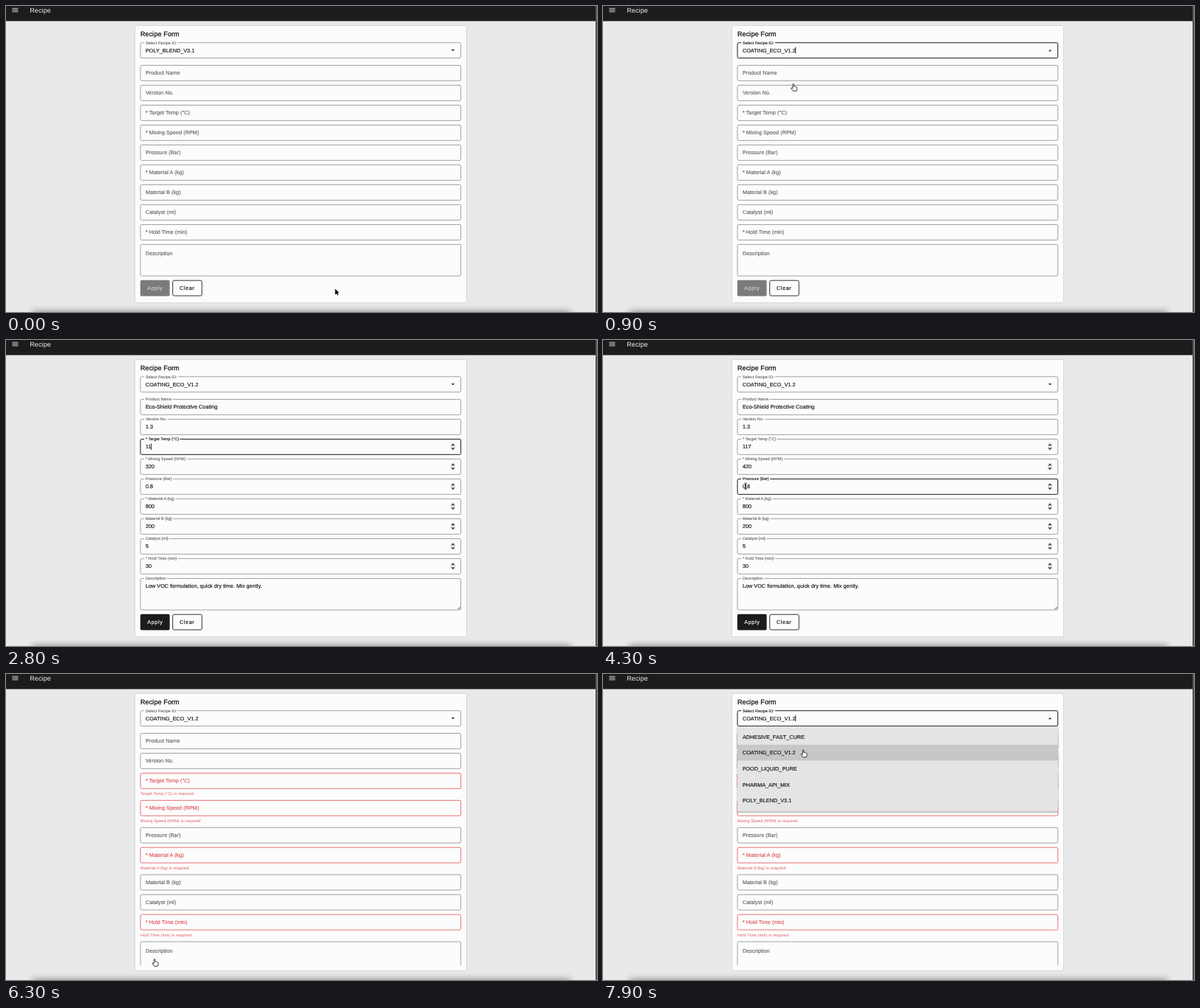
Write an HTML page that moves like this. It is 800 px wide and 415 px high and loops after 8 s.

```html
<!DOCTYPE html>
<html lang="en">
<head>
<meta charset="utf-8">
<title>Recipe form</title>
<style>
  html, body { margin: 0; width: 100%; height: 100%; overflow: hidden; background: #e9e9e9; }
  svg { display: block; width: 800px; height: 415px; }
  text {
    font: 7.2px "Liberation Sans", Arial, Helvetica, sans-serif;
    letter-spacing: .0675px; fill: #111; stroke: #111; stroke-width: .16px;
    text-rendering: geometricPrecision; white-space: pre;
  }
  .title { font-size: 9px; letter-spacing: .11px; stroke-width: .25px; }
  .head { fill: #f2f2f2; stroke: none; }
  .help { font-size: 5.4px; letter-spacing: .17px; fill: #e0555a; stroke: none; }
  .btn { letter-spacing: .64px; }
  .menu { filter: drop-shadow(0 1px 1.2px rgba(0, 0, 0, .4)); }
  .glow { filter: blur(5px); }
</style>
</head>
<body>
<svg id="stage" viewBox="0 0 800 415" xmlns="http://www.w3.org/2000/svg">
  <defs>
    <clipPath id="view"><rect x="175" y="26" width="448" height="369"/></clipPath>
  </defs>
  <rect width="800" height="415" fill="#e9e9e9"/>
  <rect width="800" height="20.5" fill="#1c1c1c"/>
  <path d="M8.4 3.3h8.1M8.4 5.55h8.1M8.4 7.8h8.1" stroke="#eee" stroke-width=".9"/>
  <text class="title head" x="32.2" y="8.9">Recipe</text>
  <rect x="174.5" y="26.5" width="449" height="376" rx="1" fill="#fcfcfc" stroke="#d6d6d6"/>
  <rect class="glow" x="36" y="414" width="728" height="20" fill="#000" opacity=".4"/>
  <rect x="798" width="2" height="415" fill="#555"/>
  <text class="title" x="182" y="41">Recipe Form</text>
  <g id="form" clip-path="url(#view)"></g>
  <g id="menu" class="menu"></g>
  <g id="mouse"></g>
</svg>
<script>
const LOOP = 8000, STEP = 100;
const FILL = 1050, RESET = 6080;
const LEFT = 182, WIDTH = 433.7, TEXT_X = 188.9;
const $ = id => document.getElementById(id);
const form = $('form'), menu = $('menu'), mouse = $('mouse');

function set(el, attrs) {
  for (const k in attrs) el.setAttribute(k, attrs[k]);
  return el;
}
function add(parent, tag, attrs, text) {
  const el = set(document.createElementNS('http://www.w3.org/2000/svg', tag), attrs);
  if (text) el.textContent = text;
  return parent.appendChild(el);
}
const ink = (el, color) => set(el, { style: `fill:${color};stroke:${color}` });
const clamp = v => Math.max(0, Math.min(1, v));
const ease = v => { v = clamp(v); return v * v * (3 - 2 * v); };
const ramp = (t, start, len = 100) => ease((t - start) / len);
const within = (t, spans) => spans.some(([a, b]) => t >= a && t < b);
const grey = (a, b, p) => { const v = Math.round(a + (b - a) * p); return `rgb(${v},${v},${v})`; };

// label, loaded value, focus spans
const specs = [
  ['Select Recipe ID:', '', [[450, 1850], [7600, LOOP + 200]]],
  ['Product Name', 'Eco-Shield Protective Coating'],
  ['Version No.', '1.3'],
  ['* Target Temp (°C)', '110', [[1850, 3500]]],
  ['* Mixing Speed (RPM)', '320', [[3500, 4150]]],
  ['Pressure (Bar)', '0.8', [[4150, 4950]]],
  ['* Material A (kg)', '800'],
  ['Material B (kg)', '200', [[4950, RESET]]],
  ['Catalyst (ml)', '5'],
  ['* Hold Time (min)', '30'],
  ['Description', 'Low VOC formulation, quick dry time. Mix gently.']
];
// time, field, value, caret position
const edits = [
  [1850, 3, '110', 3], [2300, 3, '11', 2], [2950, 3, '117', 3],
  [3500, 4, '320', 1], [3600, 4, '20', 0], [3750, 4, '420', 1],
  [4150, 5, '0.8', 1], [4400, 5, '.8', 0], [4550, 5, '1.8', 1],
  [4950, 7, '200', 1], [5300, 7, '00', 0], [5500, 7, '300', 1]
];
// time, x, y, pointer held until the next stop
const path = [
  [0, 445.5, 383.5, 'arrow'], [100, 445.5, 383.5], [400, 300, 60], [500, 300, 60],
  [750, 257.5, 105.5, 'hand'], [1100, 257.5, 105.5], [1700, 200, 145],
  [3200, 200, 145], [3450, 192.5, 171], [3850, 192.5, 171], [4050, 193, 198],
  [4700, 193, 198], [4900, 193, 252], [5700, 193, 252],
  [6050, 201, 386.5, 'hand'], [6350, 201, 386.5], [6500, 205, 349],
  [7400, 245, 147], [7530, 285, 62], [7620, 285, 62], [7820, 271, 103, 'hand'], [LOOP, 271, 103]
];
const hidden = [[2300, 3150], [3600, 3850], [4400, 4700], [5300, 5700]];
const options = ['ADHESIVE_FAST_CURE', 'COATING_ECO_V1.2', 'FOOD_LIQUID_PURE', 'PHARMA_API_MIX', 'POLY_BLEND_V3.1'];
const ROW = 21.6, MENU_TOP = 74.4;

const fields = specs.map(([label, value, focus = []], i) => {
  const g = add(form, 'g', {});
  const tall = i === 10;
  const f = {
    g, label, value, focus, tall,
    required: label[0] === '*',
    number: i > 2 && i < 10,
    base: i ? 53 + 27 * i : 49.3,
    height: tall ? 42.6 : 20.9
  };
  f.box = add(g, 'rect', { x: LEFT, y: .45, width: WIDTH, height: f.height, rx: 1.8, fill: 'none' });
  f.notch = add(g, 'rect', { x: 187, y: -.6, height: 2.4, fill: '#fcfcfc' });
  f.name = add(g, 'text', {}, label);
  f.text = add(g, 'text', { x: TEXT_X, y: 13.4 });
  if (f.number) {
    f.spin = add(g, 'g', {});
    add(f.spin, 'rect', { x: 601.6, y: 5.6, width: 6.8, height: 10.4, rx: 3, fill: '#e8e8e8' });
    add(f.spin, 'path', { d: 'M603.3 9.4l1.7-2 1.7 2M603.3 12.2l1.7 2 1.7-2', fill: 'none', stroke: '#222', 'stroke-width': 1.1 });
  }
  if (tall) f.spin = add(g, 'path', { d: 'M611.5 42l3.2-3.2M613.2 42l1.5-1.5', stroke: '#444', 'stroke-width': .8 });
  if (f.required) f.help = add(g, 'text', { class: 'help', x: 182, y: 30 }, label.slice(2) + ' is required');
  return f;
});
const chevron = add(fields[0].g, 'path', { d: 'M-2.2-1.1h4.4L0 1.1z', fill: '#222' });
const caret = add(form, 'rect', { width: .9, height: 8.6, fill: '#111' });

const buttons = add(form, 'g', {});
const apply = add(buttons, 'rect', { x: 181.8, y: 371.8, width: 39.8, height: 21.6, rx: 2 });
const applyText = add(buttons, 'text', { class: 'btn', x: 191.3, y: 385.1 }, 'Apply');
add(buttons, 'rect', { x: 225.7, y: 372.2, width: 39.5, height: 20.8, rx: 2, fill: '#fcfcfc', stroke: '#1c1c1c', 'stroke-width': .9 });
add(buttons, 'text', { class: 'btn', x: 235, y: 385.1 }, 'Clear');

add(menu, 'rect', { x: 182, y: 71.2, width: 433.6, height: 115.4, rx: 1, fill: '#e4e4e4' });
const rows = options.map((name, i) => {
  const y = MENU_TOP + ROW * i;
  const rect = add(menu, 'rect', { x: 182, y, width: 433.6, height: ROW });
  add(menu, 'text', { x: TEXT_X, y: y + 13.4 }, name);
  return rect;
});

const pointers = {
  arrow: add(mouse, 'path', {
    d: 'M0 0V8L1.9 6.4 3.2 9 4.4 8.4 3.2 5.8H5.7Z',
    fill: '#000', stroke: '#fff', 'stroke-width': .9, 'paint-order': 'stroke'
  }),
  hand: add(mouse, 'path', {
    d: 'M-.7 .8a.8 .8 0 0 1 1.6 0V3.6q1.1-.5 1.5 .3 1-.4 1.4 .4 1.2-.2 1.3 .9V7.2L4.3 9.8H-.3L-2.8 6.4q-.3-1 .6-1.1L-.7 6.2Z',
    fill: '#fff', stroke: '#222', 'stroke-width': .9
  }),
  beam: add(mouse, 'path', {
    d: 'M-1.6-4Q0-4 0-3 0-4 1.6-4M0-3V3M-1.6 4Q0 4 0 3 0 4 1.6 4',
    fill: 'none', stroke: '#222', 'stroke-width': .9
  })
};

const focusOf = (f, t) => f.focus.reduce((p, [a, b]) => p + ramp(t, a) - ramp(t, b), 0);
const hit = (f, y) => y >= f.top && y <= f.top + f.height + 1;

function mouseAt(t, open) {
  const i = Math.max(0, path.findIndex((k, n) => n + 1 < path.length && t < path[n + 1][0]));
  const [t0, x0, y0, held] = path[i], [t1, x1, y1] = path[i + 1];
  const p = ease((t - t0) / (t1 - t0));
  const x = x0 + (x1 - x0) * p, y = y0 + (y1 - y0) * p;
  const onMenu = open && y > MENU_TOP && y < MENU_TOP + ROW * 5;
  const auto = onMenu ? 'hand' : fields.some(f => hit(f, y)) ? 'beam' : 'arrow';
  const type = within(t, hidden) ? 'none' : held || auto;
  return { x, y, type, row: onMenu ? Math.floor((y - MENU_TOP) / ROW) : -1 };
}

function drawField(f, t, m, error) {
  const isSelect = f === fields[0];
  const focus = focusOf(f, t);
  const loaded = t >= FILL && t < RESET;
  const float = isSelect ? 1 : ramp(t, FILL, 150) - ramp(t, RESET, 150);
  const hover = m.type === 'beam' && hit(f, m.y);
  const red = error && f.required;
  const rest = f.tall ? 15 : 13.4;

  set(f.g, { transform: `translate(0 ${f.top})` });
  set(f.box, {
    stroke: red ? '#e5595d' : grey(hover ? 70 : 146, 26, focus),
    'stroke-width': .85 + .15 * focus
  });
  set(f.name, {
    transform: `translate(${TEXT_X} ${rest + (2.2 - rest) * float}) scale(${1 - .25 * float})`
  });
  ink(f.name, red ? '#e0555a' : grey(100, 20, focus));
  set(f.notch, { width: float > 0 ? (f.name.getComputedTextLength() * .75 + 3.4) * float : 0 });
  if (f.help) set(f.help, { visibility: error ? 'visible' : 'hidden' });
  if (f.spin) set(f.spin, { visibility: loaded ? 'visible' : 'hidden' });

  let value = loaded ? f.value : '';
  if (isSelect) value = t < 800 ? options[4] : options[1];
  else if (loaded) for (const e of edits) if (e[0] <= t && fields[e[1]] === f) value = e[2];
  if (f.text.textContent !== value) f.text.textContent = value;
}

function drawCaret(t) {
  let f = null, pos = 0;
  if (within(t, fields[0].focus)) {
    f = fields[0];
    pos = f.text.textContent.length;
  } else if (t >= 1850 && t < RESET) {
    const e = edits.filter(e => e[0] <= t).pop();
    f = fields[e[1]];
    pos = e[3];
  }
  const blink = within(t, [[2600, 2700]]) ? .4 : within(t, [[2700, 2800]]) ? 0 : 1;
  set(caret, { opacity: f ? blink : 0 });
  if (f) set(caret, {
    x: TEXT_X + (pos ? f.text.getSubStringLength(0, pos) : 0) - .3,
    y: f.top + 6.4
  });
}

function draw(t) {
  const error = t >= RESET;
  let shift = 0;
  for (const f of fields) {
    f.top = f.base + shift;
    if (error && f.required) shift += 9.9;
  }
  const shown = ramp(t, 450, 130) - ramp(t, 780, 90) + ramp(t, 7600, 130);
  const turn = ramp(t, 450, 150) - ramp(t, 860, 150) + ramp(t, 7600, 150);
  const m = mouseAt(t, shown > .5);

  for (const f of fields) drawField(f, t, m, error);
  set(chevron, { transform: `translate(605 10.9) rotate(${180 * turn})` });
  drawCaret(t);

  const ready = t >= FILL && t < RESET;
  set(buttons, { transform: `translate(0 ${shift})` });
  set(apply, { fill: ready ? '#1b1b1b' : '#7b7b7b' });
  ink(applyText, ready ? '#fff' : '#cfcfcf');

  set(menu, { opacity: shown, visibility: shown > 0 ? 'visible' : 'hidden' });
  const chosen = t < 800 ? 4 : 1;
  rows.forEach((r, i) => set(r, {
    fill: i === chosen ? (i === m.row ? '#c7c7c7' : '#cfcfcf') : i === m.row ? '#d6d6d6' : '#e4e4e4'
  }));

  set(mouse, { transform: `translate(${m.x} ${m.y})` });
  for (const k in pointers) set(pointers[k], { visibility: k === m.type ? 'visible' : 'hidden' });
}

// the screen refreshes ten times a second
function tick() {
  draw(Math.floor(performance.now() % LOOP / STEP) * STEP);
  requestAnimationFrame(tick);
}
tick();
</script>
</body>
</html>
```
